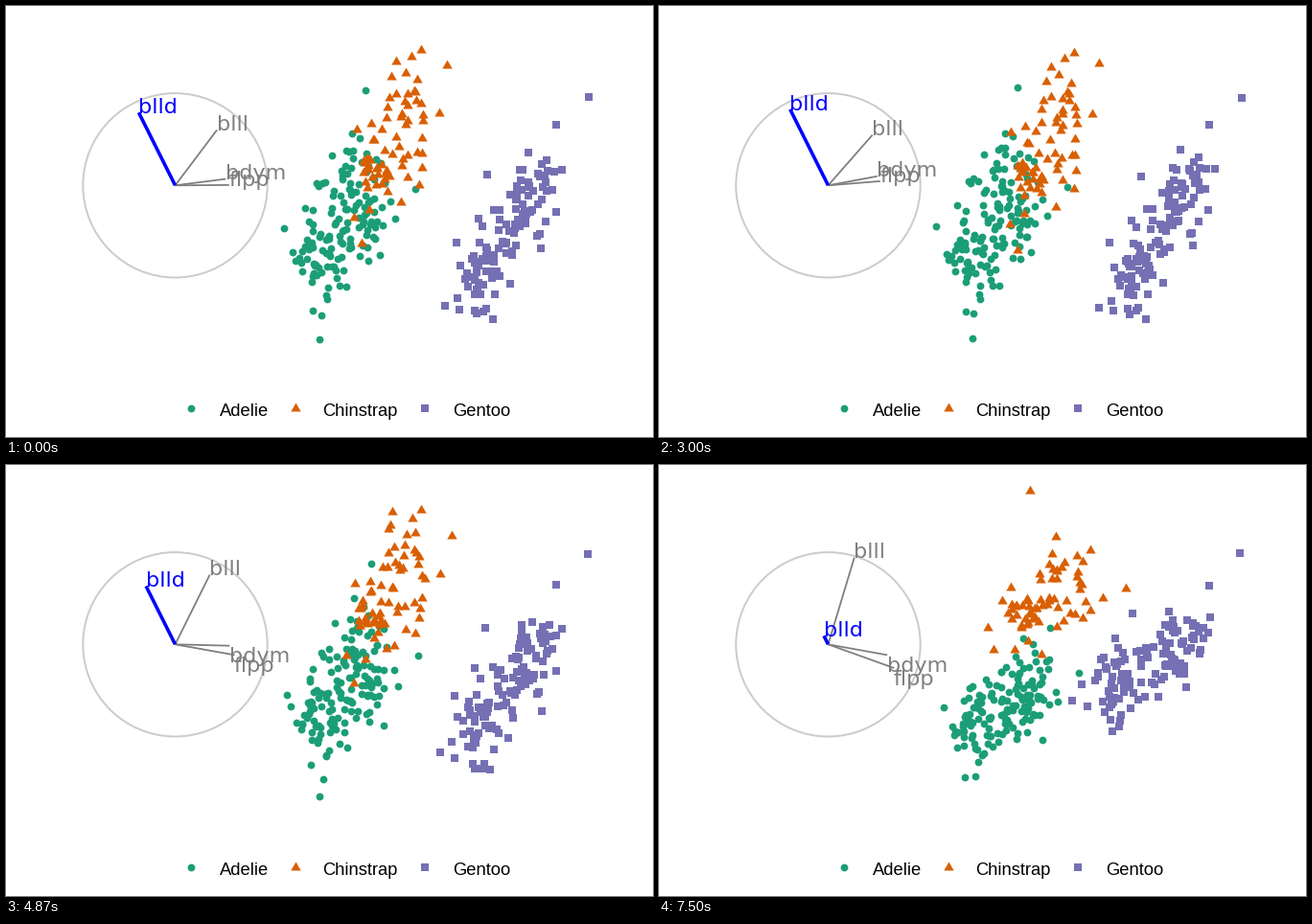
A matplotlib script that plays this animation: 675x450 px, repeating every 8000 ms.

```python
import numpy as np
import matplotlib.pyplot as plt
from matplotlib.animation import FuncAnimation

W, H, DPI = 675, 450, 150
PX = 72 / DPI                      # points per pixel
TICK, TICKS = 125, 64

# Points keep their place along ACROSS and travel only along SLIDE
ACROSS = np.array([.929, -.37])
SLIDE = np.array([-.37, -.929])
SLOPE_90, SLOPE_0 = .77, .13       # how the slide depends on the across part
SEX_SD, SLIDE_SD = 21, 21

# Per species: mean across, half gap between the sexes, mean slide at 90 and
# at 0 degrees, spread at 90; edge points: x, y at 90, travel down to 0
SPECIES = [
    dict(name="Adelie", color="#1b9e77", marker="o", size=7.8, key=193,
         text=222.5, count=146, mean=241, gap=23, s90=-337, s0=-371, sd=31,
         edge=[(324, 339, 19), (375, 88, -102), (424, 183, -40)]),
    dict(name="Chinstrap", color="#d95f02", marker=(3, 0, 0), size=12, key=302,
         text=330.3, count=68, mean=321, gap=28, s90=-311, s0=-285, sd=26,
         edge=[(446, 176, 159), (460, 62, -84), (442, 70, -32)]),
    dict(name="Gentoo", color="#7570b3", marker="s", size=8.1, key=437,
         text=466.3, count=119, mean=397, gap=38, s90=-405, s0=-377, sd=21,
         edge=[(609, 98, 7), (573, 122, -4), (459, 316, 86)]),
]

# Axis weights beside and along the manipulated direction OUT
HUB, RADIUS = np.array([176.5, 187.3]), 96.2
OUT, SIDE = np.array([-.447, .894]), np.array([.894, .447])
VARS = [("blll", .675, .72), ("flpp", .525, -.553), ("bdym", .522, -.392)]

rng = np.random.default_rng(4)


def angle(i):
    """Stepped turn: up to 90 degrees, down to 0, then back off a little."""
    step = (i + 1) // 5 if i < 48 else 10 + (i >= 52) + (i >= 60)
    if step < 3:
        return max(62.2, 90 - 12.1 * (3 - step))
    down = 90 - 11.25 * (step - 3)
    return down if down >= 0 else 6


def bounded(size, limit=2.1):
    """Centred normal draws without far tails."""
    z = rng.standard_normal(size * 3)
    z = z[np.abs(z) < limit][:size]
    return z - z.mean()


def cloud(sp):
    """Across part, slide at 90 degrees and slide at 0 degrees."""
    edge = np.array(sp["edge"], float)
    size = sp["count"] - len(edge)
    sex = np.where(np.arange(size) % 2, 1, -1)
    dn = sex * sp["gap"] + SEX_SD * bounded(size)
    e, f = bounded(size), bounded(size)
    s90 = sp["s90"] + SLOPE_90 * dn + sp["sd"] * e
    s0 = sp["s0"] + SLOPE_0 * dn + SLIDE_SD * (.25 * e + .97 * f)
    top = edge[:, :2] @ SLIDE
    return (np.r_[edge[:, :2] @ ACROSS, sp["mean"] + dn],
            np.r_[top, s90], np.r_[top + edge[:, 2], s0])


def project(n, s90, s0, a):
    mid = -385 + .19 * (n - 167)
    s = mid + (s90 - mid) * np.sin(a) + (s0 - mid) * np.cos(a)
    return np.outer(ACROSS, n) + np.outer(SLIDE, s)


fig = plt.figure(figsize=(W / DPI, H / DPI), dpi=DPI, facecolor="white")
ax = fig.add_axes([0, 0, 1, 1])
ax.set(xlim=(0, W), ylim=(H, 0))
ax.axis("off")
ax.add_patch(plt.Circle(HUB, RADIUS, fill=False, ec="#cccccc", lw=2 * PX))


def make_axis(name, color, width):
    line, = ax.plot([], [], color=color, lw=width * PX,
                    solid_capstyle="butt", zorder=3)
    label = ax.text(0, 0, name, color=color, fontsize=22.4 * PX,
                    family="DejaVu Sans", va="baseline", zorder=4)
    return line, label


def place_axis(artists, vec):
    """Labels sit above tips in the upper half and hang below the others."""
    line, label = artists
    x, y = HUB + RADIUS * vec * (1, -1)
    line.set_data([HUB[0], x], [HUB[1], y])
    drop = 8.5 if abs(vec[1]) < 1e-6 else 0 if vec[1] > 0 else 17
    label.set_position((x - .5, y + drop + .7))


axes = [make_axis(name, "#7f7f7f", 1.8) for name, _, _ in VARS]
main = make_axis("blld", "#0000ff", 3.6)

groups = []
for sp in SPECIES:
    style = dict(ls="", marker=sp["marker"], color=sp["color"],
                 ms=sp["size"] * PX, mew=0)
    ax.plot([sp["key"]], [420.3], **style)
    ax.text(sp["text"], 428, sp["name"], fontsize=18.33 * PX,
            family="Liberation Sans", color="black", va="baseline")
    dots, = ax.plot([], [], **style)
    groups.append((dots, cloud(sp)))


def update(i):
    a = np.radians(angle(i))
    for artists, (_, side, out) in zip(axes, VARS):
        place_axis(artists, side * SIDE + out * np.cos(a) * OUT)
    place_axis(main, np.sin(a) * OUT)
    for dots, data in groups:
        dots.set_data(*project(*data, a))
    return []


anim = FuncAnimation(fig, update, frames=TICKS, interval=TICK,
                     repeat=True, repeat_delay=0, blit=False)
plt.show()
```
